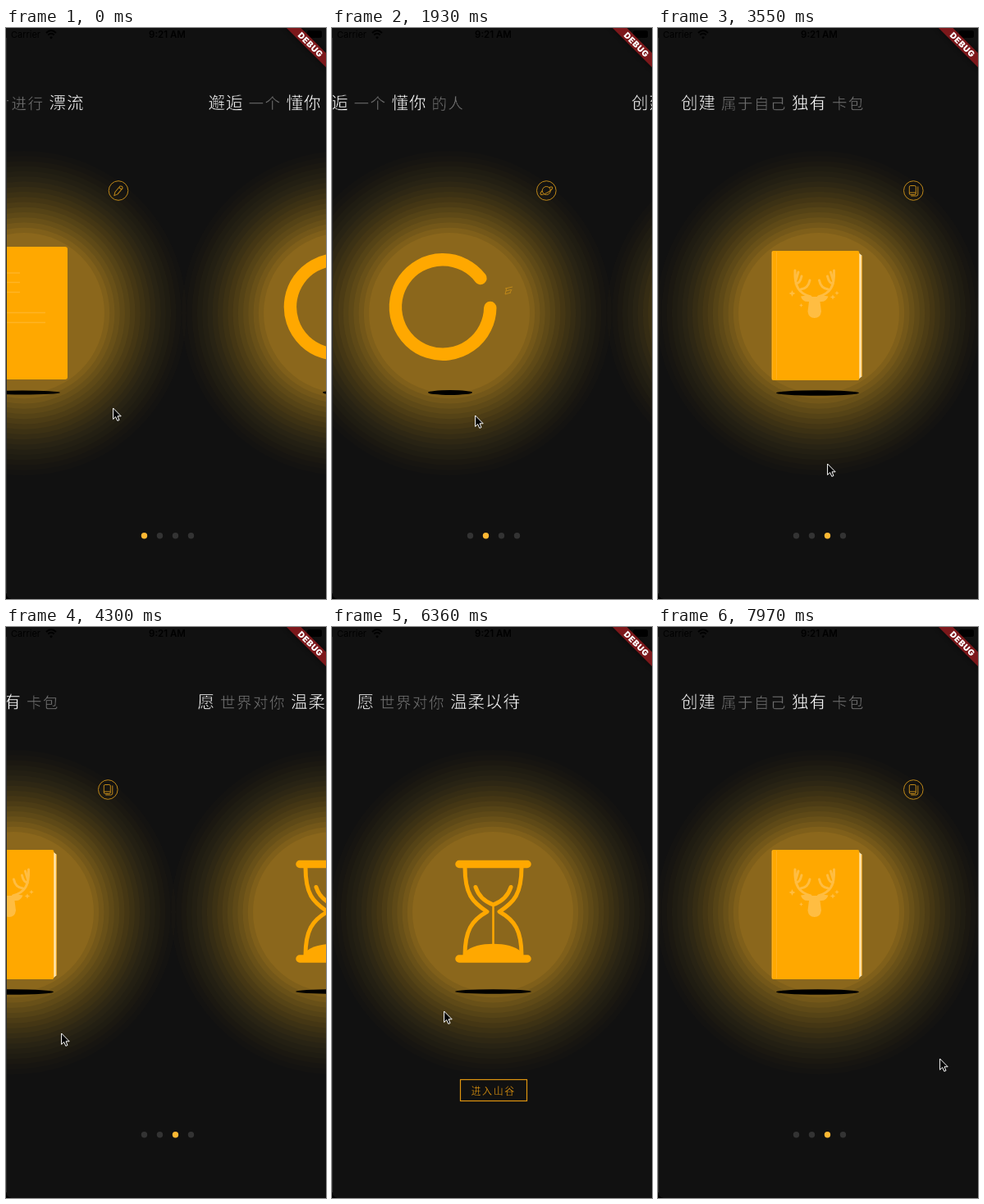
These frames come from a looping animation (390x697 px, 8 s). An HTML page:

```html
<!DOCTYPE html>
<html lang="zh-CN">
<head>
<meta charset="utf-8">
<style>
html, body { margin: 0; height: 100%; overflow: hidden; background: #111; }
svg { display: block; width: 390px; height: 697px; }
text { font-family: Inter, Roboto, sans-serif; }
/* A background-coloured stroke thins the glyphs to a light weight. */
.title, .enter { font-family: "Noto Sans CJK SC", "Noto Sans CJK JP", sans-serif; font-weight: 300; stroke: #111; stroke-width: .45; }
.strong { font-size: 20.5px; letter-spacing: 1px; fill: #fff; }
.soft { font-size: 18.5px; letter-spacing: 1.5px; fill: #747474; }
.enter { font-size: 12px; letter-spacing: 1.6px; fill: #f0a010; stroke-width: .25; }
.line { fill: none; stroke: #ffa800; stroke-linecap: round; stroke-linejoin: round; }
.icon { fill: none; stroke: #bf8819; stroke-linejoin: round; }
.deer { fill: #ffbd42; }
.antler { fill: none; stroke: #ffbd42; stroke-width: 3; stroke-linecap: round; }
</style>
</head>
<body>
<svg viewBox="0 0 390 697">
  <defs>
    <g id="glow" fill="#ffb82d"></g>
    <path id="antler" class="antler" d="M186 328C172 324 166 316 167 296M168 312Q173 312 175 303M174 319Q183 318 185 308M168 308L171 298"/>
    <path id="spark" class="deer" d="M0-4L1.2-1.2 4 0 1.2 1.2 0 4-1.2 1.2-4 0-1.2-1.2Z"/>
    <path id="side" class="line" stroke-width="5" d="M162 293C162 326 171 336 189 347.5C170 358 162 371 162 401"/>
    <filter id="blur" x="-20%" y="-100%" width="140%" height="300%"><feGaussianBlur stdDeviation="3"/></filter>
  </defs>
  <rect width="390" height="697" fill="#111"/>

  <g class="page">
    <use href="#glow"/>
    <rect x="143" y="267" width="106" height="162" rx="3" fill="#ffa800"/>
    <path d="M155 299H191M155 310.5H191M155 322.5H191M155 347.5H222M155 359.5H222" stroke="#fff" stroke-opacity=".14" stroke-width="1.5"/>
    <ellipse cx="194" cy="445" rx="46" ry="2.5"/>
    <g class="icon" transform="translate(311 198.5)">
      <circle r="11.8"/>
      <path transform="rotate(40)" d="M-2-5.5Q0-8 2-5.5V4L0 8-2 4ZM-2-3.5H2"/>
    </g>
  </g>

  <g class="page">
    <use href="#glow"/>
    <path class="line" stroke-width="15.4" d="M245.8 341.5A57.7 57.7 0 1 1 234 305.5"/>
    <path class="icon" d="M264 318L273 316M265 321L271 319.5M264 325L271 323M266 317L264 325M272 319L270 323"/>
    <ellipse cx="197" cy="445" rx="27" ry="3"/>
    <g class="icon" transform="translate(314.3 198.5)">
      <circle r="11.8"/>
      <circle r="5"/>
      <path transform="rotate(-27)" d="M-4.5-2.2C-11 0-9 3 0 2.6S11-1 4.5-2.2"/>
    </g>
  </g>

  <g class="page">
    <use href="#glow"/>
    <path d="M243 273L248.8 278V425L243 430Z" fill="#ffe6b0"/>
    <path d="M248.3 278V425" stroke="#e69a12"/>
    <rect x="138.5" y="272" width="106.8" height="158" rx="2" fill="#ffa800"/>
    <path d="M139.5 273V429M144.5 273V429" stroke="#ffb62f" stroke-opacity=".7"/>
    <use href="#antler"/>
    <use href="#antler" transform="matrix(-1 0 0 1 381.5 0)"/>
    <path class="deer" d="M184 334Q176 335 174 327.5Q182 326 186 328H195.5Q199 326 207.5 327.5Q205 335 197.5 334L199 346Q198 354 190.7 354Q183.5 354 182.5 346Z"/>
    <use href="#spark" x="163.5" y="324"/>
    <use href="#spark" transform="translate(213 328.5) scale(.8)"/>
    <use href="#spark" transform="translate(218 323.5) scale(.7)"/>
    <use href="#spark" transform="translate(174.5 338.5) scale(.6)"/>
    <ellipse cx="194.5" cy="445.5" rx="50.5" ry="3.2"/>
    <g class="icon" transform="translate(311.3 198.5)">
      <circle r="11.8"/>
      <rect x="-5" y="-6" width="8" height="11" rx="1.5"/>
      <path d="M5.5-5V4.5Q5.5 6.5 3.5 6.5H-3M-5 2.5H3"/>
    </g>
  </g>

  <g class="page">
    <use href="#glow"/>
    <path class="line" stroke-width="9.5" d="M155 289.5H238M155 405H238"/>
    <use href="#side"/>
    <use href="#side" transform="matrix(-1 0 0 1 393 0)"/>
    <path class="line" stroke-width="5" d="M175 317.5Q180 333 196.5 339Q213 333 218 317.5"/>
    <path class="line" stroke-width="2.5" d="M196.5 340V390"/>
    <path d="M163 402V396C175 383.5 218 383.5 230 396V402Z" fill="#ffa800"/>
    <ellipse cx="196.5" cy="445" rx="46.5" ry="2.8"/>
  </g>

  <g id="dots"></g>
  <g id="button">
    <rect x="156.5" y="552.5" width="81" height="26" fill="none" stroke="#e09510" stroke-width="1.2"/>
    <text class="enter" x="169.5" y="570.5">进入山谷</text>
  </g>

  <text x="6" y="12" font-size="11">Carrier</text>
  <g fill="none" stroke="#000" stroke-width="1.8">
    <path d="M49 6Q55 0 61 6M51.3 8.5Q55 5 58.7 8.5"/>
    <path d="M53.8 11L55 12.2 56.2 11"/>
  </g>
  <text x="196.5" y="12" font-size="11.5" font-weight="600" text-anchor="middle">9:21 AM</text>
  <rect x="367" y="3" width="18" height="9" rx="2.5"/>
  <g transform="translate(371.2 20.5) rotate(45)">
    <rect x="-60" y="-6" width="120" height="12" opacity=".5" filter="url(#blur)"/>
    <rect x="-60" y="-6.2" width="120" height="12.4" fill="#7c181b"/>
    <text y="3.7" font-size="10.2" font-weight="900" letter-spacing=".6" text-anchor="middle" fill="#fff">DEBUG</text>
  </g>
  <path d="M.5 12V690" stroke="#2c2c2c"/>
  <path d="M0 690Q1 696 7 697H0Z"/>
  <path id="cursor" d="M.6 1V14.5L3.7 11.6 5.8 16.4 8 15.5 6 10.8H10.2Z" stroke="#fff"/>
</svg>
<script>
const $ = id => document.getElementById(id);
const pages = [...document.querySelectorAll('.page')];
const PAGE = 390, LOOP = 8000, STEP = 147.7;
const clamp = u => Math.min(1, Math.max(0, u));
const smooth = u => u * u * (3 - 2 * u);

// Stacked translucent discs add up to the banded halo.
const RINGS = 17;
const level = u => 0.51 * (0.3 * u + 0.7 * u * u);
let halo = '';
for (let i = 0; i < RINGS; i++) {
  const before = level(i / RINGS), after = level((i + 1) / RINGS);
  halo += `<circle cx="196" cy="348" r="${198 - 100 * i / (RINGS - 1)}" opacity="${(after - before) / (1 - before)}"/>`;
}
$('glow').innerHTML = halo;

// Words alternate between strong and soft.
function addTitle(page, x, words) {
  const spans = words.split('|').map((word, i) =>
    word && `<tspan class="${i % 2 ? 'soft' : 'strong'}" dx="${i ? 6 : 0}">${word}</tspan>`);
  page.insertAdjacentHTML('beforeend', `<text class="title" x="${x}" y="99">${spans.join('')}</text>`);
}
addTitle(pages[0], 134.5, '|卡片进行|漂流');
addTitle(pages[1], 30.5, '邂逅|一个|懂你|的人');
addTitle(pages[2], 28, '创建|属于自己|独有|卡包');
addTitle(pages[3], 30.5, '愿|世界对你|温柔以待');

$('dots').innerHTML = pages.map((_, i) => `<circle cx="${168.5 + 19 * i}" cy="619.7" r="3.7"/>`).join('');
const dots = [...$('dots').children];

// Each swipe grabs the page at (x, y), drags it until release and lets it settle.
const swipes = [
  { start: -590, release: 50, end: 680, turn: 1, x: 304, y: 463 },
  { start: 1520, release: 3250, end: 3250, turn: 1, x: 227, y: 472 },
  { start: 3695, release: 4330, end: 4905, turn: 1, x: 254, y: 495 },
  { start: 6646, release: 7150, end: 7665, turn: -1, x: 138, y: 450 },
];
const finish = { start: 7976, x: 343, y: 526 };

const moved = (s, t) => s.turn * PAGE * smooth(clamp((t - s.start) / (s.end - s.start)));

// The cursor follows the page while dragging, then arcs to the next grab point.
function cursorAt(t) {
  const i = swipes.findLastIndex(s => t >= s.start);
  const s = swipes[i], next = swipes[i + 1] || finish;
  const x = s.x - moved(s, Math.min(t, s.release));
  const u = clamp((t - s.release) / (next.start - s.release));
  const ease = 1 - (1 - u) ** 2;
  return [x + (next.x - x) * ease, s.y + (next.y - s.y) * ease + 44 * Math.sin(Math.PI * u)];
}

function draw() {
  // The screen refreshes in coarse steps.
  const t = STEP * Math.floor((performance.now() % LOOP + 8) / STEP);
  const scroll = Math.round(swipes.reduce((sum, s) => sum + moved(s, t), 0));
  const current = Math.round(scroll / PAGE);
  pages.forEach((page, i) => page.setAttribute('transform', `translate(${i * PAGE - scroll} 0)`));
  dots.forEach((dot, i) => dot.setAttribute('fill', i === current ? '#ffb833' : '#333'));
  $('dots').style.display = current === 3 ? 'none' : '';
  $('button').style.display = current === 3 ? '' : 'none';
  $('cursor').setAttribute('transform', `translate(${cursorAt(t).map(Math.round)})`);
  requestAnimationFrame(draw);
}
draw();
</script>
</body>
</html>
```
